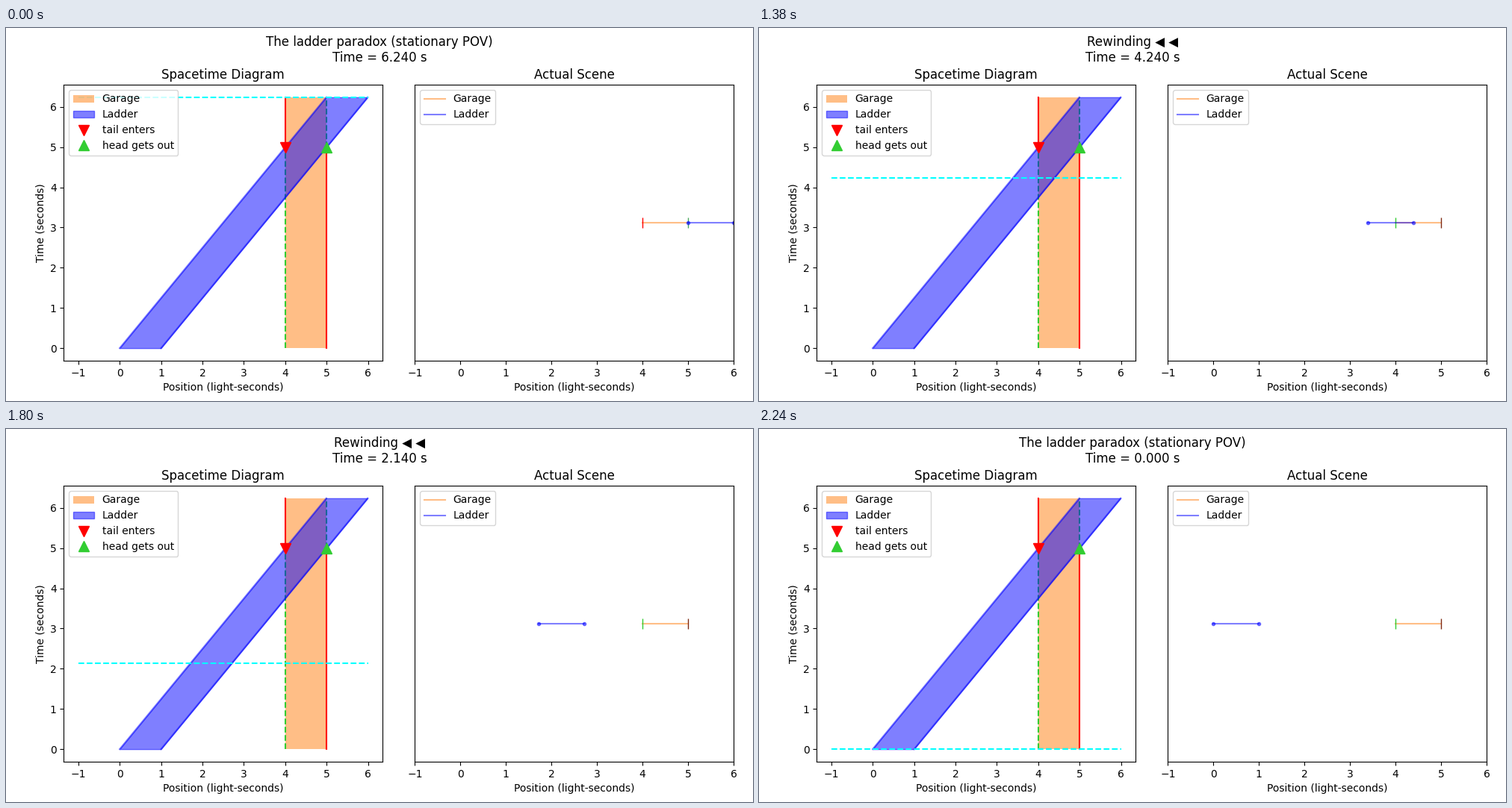
Recreate the animation shown at these times as a matplotlib script. Size 1000 px wide and 500 px high, loop 3.24 s.

```python
import matplotlib.pyplot as plt
from matplotlib.animation import FuncAnimation

plt.rcParams["font.family"] = "DejaVu Sans"

STEP_MS = 20
HOLD = 50            # frames of rest at each end
REWIND = 62          # frames of rewinding
T_END = 6.24
DT = 0.1
SPEED = 0.8
T_DOOR = 5.0
ENTRY, EXIT = 4, 5

fig = plt.figure(figsize=(10, 5), dpi=100)
title = fig.suptitle("")


def make_axes(left, name):
    ax = fig.add_axes([left, 0.108, 0.4267, 0.74])
    ax.set_title(name)
    ax.set_xlabel("Position (light-seconds)")
    return ax


# Spacetime diagram
st = make_axes(0.0773, "Spacetime Diagram")
st.set_ylabel("Time (seconds)")
st.set_xlim(-1.35, 6.35)
st.set_ylim(-0.05 * T_END, 1.05 * T_END)

st.fill_betweenx([0, T_END], ENTRY, EXIT, color="tab:orange", alpha=0.5,
                 lw=0, label="Garage")


def door(x, t0, t1, is_open):
    color, ls = ("limegreen", "--") if is_open else ("red", "-")
    st.plot([x, x], [t0, t1], color=color, ls=ls, zorder=1.5)


door(ENTRY, 0, T_DOOR, True)
door(ENTRY, T_DOOR, T_END, False)
door(EXIT, 0, T_DOOR, False)
door(EXIT, T_DOOR, T_END, True)

tail_end = SPEED * T_END
st.fill_betweenx([0, T_END], [0, tail_end], [1, tail_end + 1], color="blue",
                 alpha=0.5, zorder=2, label="Ladder")
for x0 in (0, 1):
    st.plot([x0, x0 + tail_end], [0, T_END], color="blue", alpha=0.5)

st.plot(ENTRY, T_DOOR, "v", color="red", ms=10, label="tail enters")
st.plot(EXIT, T_DOOR, "^", color="limegreen", ms=10, label="head gets out")
now, = st.plot([-1, 6], [0, 0], "--", color="cyan")
st.legend(loc="upper left")

# Scene
sc = make_axes(0.5473, "Actual Scene")
sc.set_xlim(-1, 6)
sc.set_ylim(-1, 1)
sc.set_yticks([])
sc.plot([ENTRY, EXIT], [0, 0], color="tab:orange", alpha=0.5, label="Garage")
entry, = sc.plot([ENTRY], [0], "|", ms=10)
exit_, = sc.plot([EXIT], [0], "|", ms=10)
ladder, = sc.plot([0, 1], [0, 0], color="blue", alpha=0.5, label="Ladder")
ends, = sc.plot([0, 1], [0, 0], ".", color="blue", alpha=0.5)
sc.legend(loc="upper left")


def update(i):
    k = min(max(i - HOLD + 1, 0), REWIND + 1)
    t = max(T_END - DT * k, 0)
    if k > REWIND:
        t = 0
    rewinding = 0 < k <= REWIND
    head = "Rewinding ◀ ◀" if rewinding else "The ladder paradox (stationary POV)"
    title.set_text(f"{head}\nTime = {t:.3f} s")

    now.set_ydata([t, t])
    tail = SPEED * t
    for part in (ladder, ends):
        part.set_xdata([tail, tail + 1])
    inside = t >= T_DOOR
    entry.set_color("red" if inside else "limegreen")
    exit_.set_color("#4ca960" if inside else "#7f2a14")
    return title, now, ladder, ends, entry, exit_


anim = FuncAnimation(fig, update, frames=2 * HOLD + REWIND,
                     interval=STEP_MS, repeat=True, repeat_delay=0)
plt.show()
```
